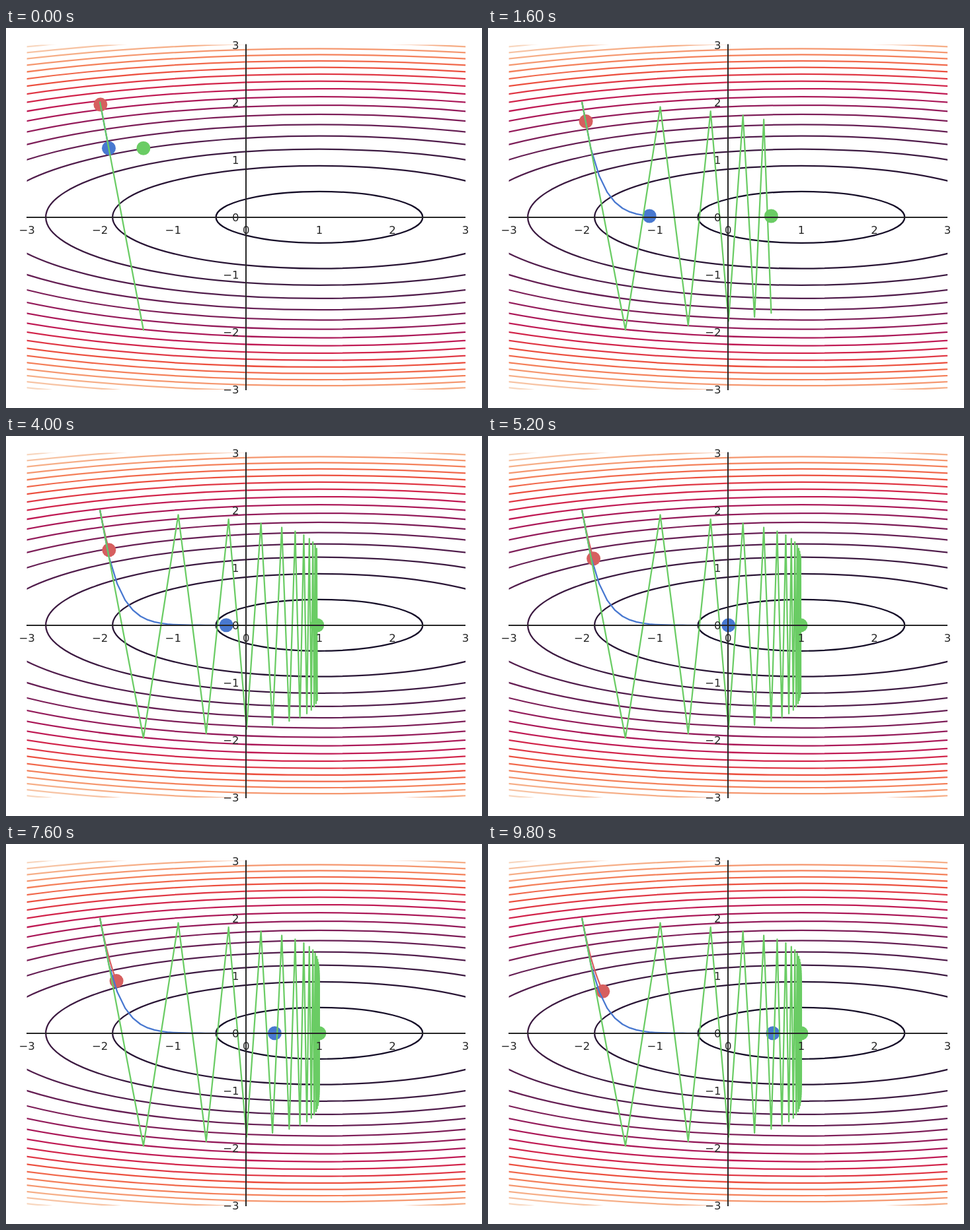
An HTML page that plays this animation: 720 px wide and 576 px high, repeating every 10 s.

```html
<!DOCTYPE html>
<html lang="en">
<head>
<meta charset="utf-8">
<title>Gradient descent with three step sizes</title>
<style>
  html, body { margin: 0; width: 100%; height: 100%; overflow: hidden; background: #fff; }
  svg { display: block; width: 720px; height: 576px; }
  text { font: 16.5px "DejaVu Sans", sans-serif; fill: #262626; }
  .curve { fill: none; stroke-width: 2.25; stroke-linejoin: round; stroke-linecap: round; }
  .spine { stroke: #262626; stroke-width: 2; }
</style>
</head>
<body>
<svg id="plot" viewBox="0 0 720 576">
  <clipPath id="area"><rect x="31.6" y="25.5" width="663.5" height="522.6"/></clipPath>
</svg>
<script>
const STEP_MS = 200, STEPS = 50;
const START = [-2, 2];
const px = x => 363.35 + 110.58 * x;
const py = y => 286.8 - 87.1 * y;

// Evenly spaced stops of the contour colour scale
const SCALE = ["03051a", "221331", "451c47", "6a1f56", "921c5b", "b91657",
               "d92847", "ed513e", "f47c56", "f6a47b", "f7c9aa", "faebdd"];

const plot = document.getElementById("plot");

function add(parent, tag, attrs, content) {
  const node = document.createElementNS("http://www.w3.org/2000/svg", tag);
  for (const key in attrs) node.setAttribute(key, attrs[key]);
  if (content !== undefined) node.textContent = content;
  parent.appendChild(node);
  return node;
}

function scaleColor(t) {
  const pos = t * (SCALE.length - 1), i = Math.floor(pos), mix = pos - i;
  const channel = k => {
    const [a, b] = [SCALE[i], SCALE[i + 1]].map(hex => parseInt(hex.substr(2 * k, 2), 16));
    return Math.round(a + (b - a) * mix);
  };
  return `rgb(${[0, 1, 2].map(channel)})`;
}

// Contours of f(x, y) = (x - 1)² / 2 + 5y²
const field = add(plot, "g", { "clip-path": "url(#area)" });
const LEVELS = 18;
for (let i = 0; i < LEVELS; i++) {
  const level = 1 + 3 * i;
  add(field, "ellipse", {
    class: "curve", cx: px(1), cy: py(0),
    rx: 110.58 * Math.sqrt(2 * level), ry: 87.1 * Math.sqrt(level / 5),
    stroke: scaleColor((i + 1) / (LEVELS + 1))
  });
}

// Closed form of n gradient steps with the given learning rate
const descend = (rate, n) => [
  1 + (START[0] - 1) * (1 - rate) ** n,
  START[1] * (1 - 10 * rate) ** n
];

const MIDDLE_RATE = 0.04;
const runs = [
  { rate: 0.002, dotRate: 0.002, color: "#d65f5f" },
  { rate: MIDDLE_RATE, dotRate: MIDDLE_RATE, color: "#4878d0" },
  // This marker shares its height with the middle run
  { rate: 0.198, dotRate: MIDDLE_RATE, color: "#6acc64" }
];
for (const run of runs) {
  run.path = add(plot, "polyline", { class: "curve", stroke: run.color });
  run.dot = add(plot, "circle", { r: 10.5, fill: run.color });
}

add(plot, "line", { class: "spine", x1: 31, y1: 287, x2: 695, y2: 287 });
add(plot, "line", { class: "spine", x1: 363, y1: 24.5, x2: 363, y2: 549 });
for (let v = -3; v <= 3; v++) {
  const label = String(v).replace("-", "\u2212");
  add(plot, "text", { x: px(v), y: 312, "text-anchor": "middle" }, label);
  add(plot, "text", { x: 352.6, y: Math.round(py(v) + 6), "text-anchor": "end" }, label);
}

function draw(n) {
  for (const { rate, dotRate, path, dot } of runs) {
    const points = Array.from({ length: n + 1 }, (_, k) => {
      const [x, y] = descend(rate, k);
      return `${px(x).toFixed(2)},${py(y).toFixed(2)}`;
    });
    path.setAttribute("points", points.join(" "));
    dot.setAttribute("cx", px(descend(rate, n)[0]));
    dot.setAttribute("cy", py(descend(dotRate, n)[1]));
  }
}

const began = performance.now();
let shown = 0;
function tick() {
  const elapsed = Math.max(0, performance.now() - began);
  const n = Math.floor(elapsed / STEP_MS) % STEPS + 1;
  if (n !== shown) draw(shown = n);
  requestAnimationFrame(tick);
}
tick();
</script>
</body>
</html>
```
